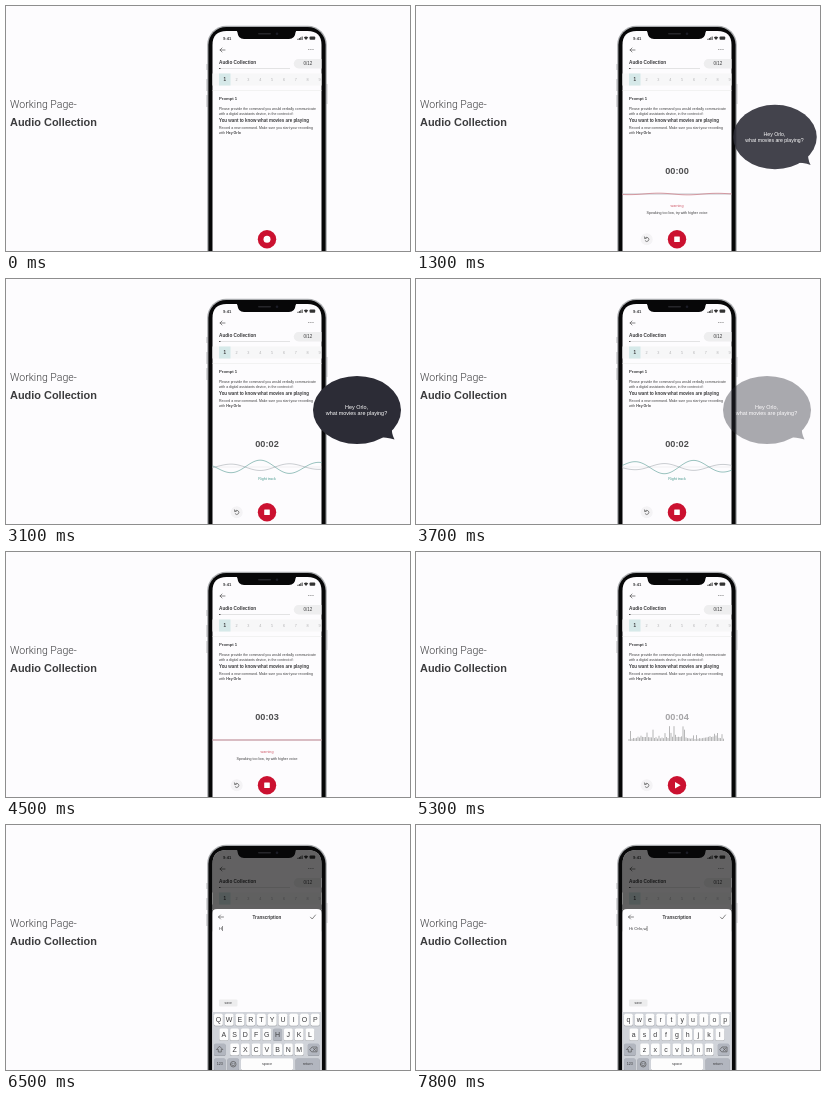
Animation, 404 px wide and 245 px high, one loop 8000 ms. Source, as an HTML page:

```html
<!DOCTYPE html>
<html lang="en">
<head>
<meta charset="utf-8">
<title>Audio Collection</title>
<style>
  html, body { margin: 0; width: 100%; height: 100%; overflow: hidden; background: #fdfcfe; }
  svg { display: block; width: 404px; height: 245px; }
  text { font-family: "Liberation Sans", Arial, sans-serif; fill: #3c3c3e; }
  .b { font-weight: 700; }
  .m { text-anchor: middle; }
  .line { fill: none; stroke: #555; stroke-width: .7; stroke-linecap: round; stroke-linejoin: round; }
  .wave { fill: none; stroke-width: .7; }
</style>
</head>
<body>
<svg viewBox="0 0 404 245">
  <defs>
    <clipPath id="screenClip"><path d="M206.5 245V39Q206.5 25 220.5 25H301.5Q315.5 25 315.5 39V245Z"/></clipPath>
  </defs>
  <rect width="404" height="245" fill="#fdfcfe"/>

  <text x="4" y="101.5" font-size="10.5" style="font-family:Roboto,sans-serif;font-weight:300">Working Page-</text>
  <text class="b" x="4" y="119.5" font-size="10.95">Audio Collection</text>

  <g fill="#c0c1c4">
    <rect x="200.4" y="58" width="1.6" height="6"/><rect x="200.4" y="73" width="1.6" height="12"/>
    <rect x="200.4" y="89" width="1.6" height="12"/><rect x="320" y="78" width="1.4" height="20"/>
  </g>
  <rect x="201.2" y="19.8" width="119.6" height="260" rx="19" fill="#a9abae"/>
  <rect x="202.4" y="21" width="117.2" height="260" rx="18" fill="#070708"/>

  <g clip-path="url(#screenClip)">
    <rect x="206" y="24" width="110" height="221" fill="#fdfcfe"/>
    <text class="b" x="217" y="34" font-size="4.1">9:41</text>
    <g fill="#333">
      <path d="M291.5 34v-1.2h.9V34zM292.9 34v-2h.9v2zM294.3 34v-2.8h.9V34zM295.7 34v-3.6h.9V34z"/>
      <path d="M297.8 31.4Q300 29.4 302.2 31.4L300 34Z"/>
      <rect x="303.6" y="30.4" width="5.6" height="3.4" rx=".8"/>
    </g>
    <path class="line" d="M219 44h-5m2-2l-2 2l2 2"/>
    <g fill="#777"><circle cx="302.8" cy="43.5" r=".6"/><circle cx="304.9" cy="43.5" r=".6"/><circle cx="307" cy="43.5" r=".6"/></g>
    <text class="b" x="213" y="57.5" font-size="4.7">Audio Collection</text>
    <path d="M213 62.5h71" stroke="#ddd" stroke-width=".8"/>
    <path d="M213 62.5h1.5" stroke="#555" stroke-width="1"/>
    <path d="M292.5 53H316v9.5H292.5a4.75 4.75 0 0 1 0-9.5Z" fill="#eeeeef"/>
    <text class="m" x="302" y="59.4" font-size="4.5">0/12</text>
    <rect x="206" y="67.5" width="110" height="12" fill="#f7f7f8"/>
    <rect x="213" y="67.5" width="11.5" height="12" fill="#d6e9e9"/>
    <g id="numbers"></g>
    <path d="M206 84.5h110" stroke="#eee" stroke-width=".7"/>

    <text class="b" x="213" y="94" font-size="4.2">Prompt 1</text>
    <g font-size="3.5">
      <text x="213" y="103.5">Please provide the command you would verbally communicate</text>
      <text x="213" y="108.7">with a digital assistants device, in the context of:</text>
      <text class="b" x="213" y="116" font-size="4.45">You want to know what movies are playing</text>
      <text x="213" y="123">Record a new command. Make sure you start your recording</text>
      <text x="213" y="128">with <tspan class="b">Hey Orlo</tspan></text>
    </g>

    <g id="session">
      <text id="timer" class="b m" x="261" y="167.5" font-size="9.2" style="fill:#505052">00:00</text>
      <g id="live">
        <path d="M206 188h110" stroke="#e2e2e4" stroke-width=".5"/>
        <path id="backWave" class="wave" stroke="#b4b8be"/>
        <path id="frontWave" class="wave"/>
      </g>
      <path id="bars" stroke="#888" stroke-width=".6"/>
      <g id="lowHint">
        <text class="m" x="261" y="200.5" font-size="3.7" style="fill:#cf5868">warning</text>
        <text class="m" x="261" y="208" font-size="3.6">Speaking too low, try with higher voice</text>
      </g>
      <text id="okHint" class="m" x="261" y="200.5" font-size="3.7" style="fill:#4b9a90">Right track</text>
      <circle cx="230.7" cy="233.3" r="6" fill="#f4f3f5"/>
      <path class="line" d="M228.9 232.4a2.1 2.1 0 1 1 .3 2.4M228.5 230.9l.3 1.6l1.6-.3"/>
    </g>
    <circle cx="261" cy="233.3" r="9.2" fill="#cb1130"/>
    <rect id="recordMark" fill="#fff"/>
    <path id="playMark" d="M259 230l5.6 3.3l-5.6 3.3Z" fill="#fff"/>

    <g id="sheet">
      <rect x="206" y="7.5" width="110" height="100" rx="3" fill="#000" opacity=".61"/>
      <path d="M206 300V89Q206 84 211 84H311Q316 84 316 89V300Z" fill="#fdfcfe"/>
      <path class="line" d="M217.5 92h-5m2-2l-2 2l2 2"/>
      <path class="line" d="M304.5 92.2l1.7 1.8l3.3-4"/>
      <text class="b m" x="261" y="93.7" font-size="4.55">Transcription</text>
      <text id="typed" x="213" y="105" font-size="4.3"></text>
      <path id="caret" stroke="#444" stroke-width=".6"/>
      <rect x="213" y="174.5" width="18.5" height="7" rx="1" fill="#ededee"/>
      <text class="m" x="222.2" y="179.2" font-size="3.4">save</text>
      <rect x="206" y="187" width="110" height="60" fill="#d0d3d9"/>
      <g id="keys"></g>
    </g>
  </g>
  <path d="M229 24H292Q289.5 24.5 289.5 26.5Q289 33 283 33H238Q232 33 231.5 26.5Q231.5 24.5 229 24Z" fill="#070708"/>
  <rect x="252" y="27" width="13" height="1.6" rx=".8" fill="#26262a"/>
  <circle cx="271" cy="27.8" r="1.3" fill="#1c1d26"/>

  <g id="bubble">
    <path d="M366 158Q380 157.5 388.5 160.5Q385 154 386 146Z" fill="#2c2c36"/>
    <ellipse cx="351" cy="131" rx="44" ry="34" fill="#2c2c36"/>
    <g class="m" font-size="5.45">
      <text x="350.5" y="129.6" style="fill:#fff">Hey Orlo,</text>
      <text x="350.5" y="136.2" style="fill:#fff">what movies are playing?</text>
    </g>
  </g>
</svg>
<script>
const NS = 'http://www.w3.org/2000/svg';
const LOOP = 8000;
const el = Object.fromEntries([...document.querySelectorAll('[id]')].map(n => [n.id, n]));

const clamp = v => Math.min(1, Math.max(0, v));
const ramp = (t, from, to) => clamp((t - from) / (to - from));
const easeOut = p => 1 - (1 - p) ** 2;
const sineOut = p => Math.sin(p * Math.PI / 2);
const fade = (node, value) => node.setAttribute('opacity', value.toFixed(3));

function add(parent, tag, attrs, text = '') {
  const node = document.createElementNS(NS, tag);
  for (const name in attrs) node.setAttribute(name, attrs[name]);
  node.textContent = text;
  parent.append(node);
  return node;
}

for (let i = 0; i < 9; i++) {
  add(el.numbers, 'text', {
    x: 218.7 + i * 11.85, y: 75.2, class: i ? 'm' : 'm b', 'font-size': i ? 3.8 : 4.5,
    style: i ? 'fill:#b0b0b2' : ''
  }, i + 1);
}

let barPath = '';
for (let i = 0; i < 64; i++) {
  const noise = Math.abs(Math.sin(i * 12.9898) * 43758.5453) % 1;
  const height = 2 + 12 * noise ** 5 + 2 * Math.sin(i / 7) ** 2;
  barPath += `M${213 + i * 1.5} 189v${-height.toFixed(1)}`;
}
el.bars.setAttribute('d', barPath);

const letters = {};
function addKey(cx, cy, width, label, fill = '#fdfdfd', size = 3.8) {
  const box = { x: cx - width / 2, y: cy - 6, width, height: 12, rx: 1.6 };
  add(el.keys, 'rect', { ...box, y: box.y + .6, fill: '#94979d' });
  const cap = add(el.keys, 'rect', { ...box, fill });
  const text = add(el.keys, 'text', { x: cx, y: cy + size * .33, class: 'm', 'font-size': size }, label);
  return { cap, text };
}
[['qwertyuiop', 212.4, 194.7], ['asdfghjkl', 217.8, 209.5], ['zxcvbnm', 228.6, 224.4]].forEach(([row, x, y]) =>
  [...row].forEach((c, i) => letters[c] = addKey(x + i * 10.76, y, 8.9, c, '#fdfdfd', 7)));
const GREY = '#b2b6bf';
addKey(213.8, 224.4, 11.5, '', GREY);
addKey(307.6, 224.4, 11.5, '', GREY);
addKey(213.8, 239.2, 11.5, '123', GREY);
addKey(227.2, 239.2, 11.5, '', GREY);
addKey(261, 239.2, 52, 'space');
addKey(301.6, 239.2, 24, 'return', GREY);
for (const d of [
  'M213.8 221.5l3 3h-1.5v2.5h-3v-2.5h-1.5Z',
  'M304 224.4l2-2.4h5v4.8h-5ZM307.5 223.3l2 2.2m0-2.2l-2 2.2',
  'M224.4 239.2a2.8 2.8 0 1 1 5.6 0a2.8 2.8 0 1 1 -5.6 0M225.7 240q1.5 1.6 3 0M226.2 238.3v.2M228.2 238.3v.2'
]) add(el.keys, 'path', { d, class: 'line' });

// time, text so far, key held down
const TYPING = [
  [0, '', ''], [6500, 'H', 'h'], [6600, 'H', ''], [7000, 'Hi', 'i'], [7100, 'Hi O', 'o'],
  [7200, 'Hi Or', 'r'], [7300, 'Hi Orl', 'l'], [7400, 'Hi Orlo', 'o'], [7500, 'Hi Orlo,', ''],
  [7700, 'Hi Orlo,', 'w'], [7800, 'Hi Orlo,w', '']
];

function wavePath(amp, length, trough, phase) {
  let d = '';
  for (let x = 206; x <= 316; x += 2) {
    const swell = .65 + .35 * Math.sin((x - 206) / 110 * Math.PI);
    const y = 188 + amp * swell * Math.cos((x - trough) / length * 2 * Math.PI - phase);
    d += `${d ? 'L' : 'M'}${x} ${y.toFixed(2)}`;
  }
  return d;
}

function drawSession(t) {
  const appear = ramp(t, 400, 800);
  fade(el.session, appear);
  const seconds = Math.min(4, Math.max(0, Math.floor((t - 800) / 1000)));
  el.timer.textContent = `00:0${seconds}`;

  const quiet = ramp(t, 3900, 4250);
  const loud = ramp(t, 1400, 1950) * (1 - quiet);
  const phase = (t - 2200) / 1500 * 2 * Math.PI;
  el.frontWave.setAttribute('d', wavePath(.9 * (1 - quiet) + 6 * loud, 60, 248, phase));
  el.backWave.setAttribute('d', wavePath(3.5 * loud, 60, 278, phase));
  el.frontWave.setAttribute('stroke', loud > .3 ? '#6fa9a4' : '#cf7a84');

  const stopped = ramp(t, 4900, 5200);
  fade(el.timer, 1 - .5 * stopped);
  fade(el.live, 1 - stopped);
  fade(el.bars, stopped);
  fade(el.okHint, loud * (1 - stopped));
  fade(el.lowHint, (1 - loud) * (1 - stopped));

  const size = 7 - easeOut(appear) * 1.4;
  const mark = { x: 261 - size / 2, y: 233.3 - size / 2, width: size, height: size, rx: 3.5 - 3 * appear };
  for (const name in mark) el.recordMark.setAttribute(name, mark[name]);
  fade(el.recordMark, 1 - stopped);
  fade(el.playMark, stopped);
}

function drawBubble(t) {
  const p = easeOut(ramp(t, 1000, 1600));
  const scale = .8 + .2 * p;
  el.bubble.setAttribute('transform',
    `translate(${351 + 32 * (1 - p)} 131) scale(${scale}) translate(-351 -131)`);
  fade(el.bubble, ramp(t, 1000, 1340) * (1 - ramp(t, 3400, 3900)));
}

function drawSheet(t) {
  const p = sineOut(ramp(t, 5650, 6300));
  el.sheet.setAttribute('transform', `translate(0 ${240 * (1 - p)})`);
  const [, text, held] = TYPING.findLast(step => t >= step[0]);
  el.typed.textContent = text;
  const end = 213.4 + (text ? el.typed.getComputedTextLength() : 0);
  el.caret.setAttribute('d', `M${end} 101v5`);
  fade(el.caret, t >= 6300 ? 1 : 0);
  for (const c in letters) {
    letters[c].cap.setAttribute('fill', c === held ? GREY : '#fdfdfd');
    letters[c].text.textContent = t < 6700 ? c.toUpperCase() : c;
  }
}

const start = performance.now();
function frame() {
  const t = (performance.now() - start) % LOOP;
  drawSession(t);
  drawBubble(t);
  drawSheet(t);
  requestAnimationFrame(frame);
}
frame();
</script>
</body>
</html>
```
